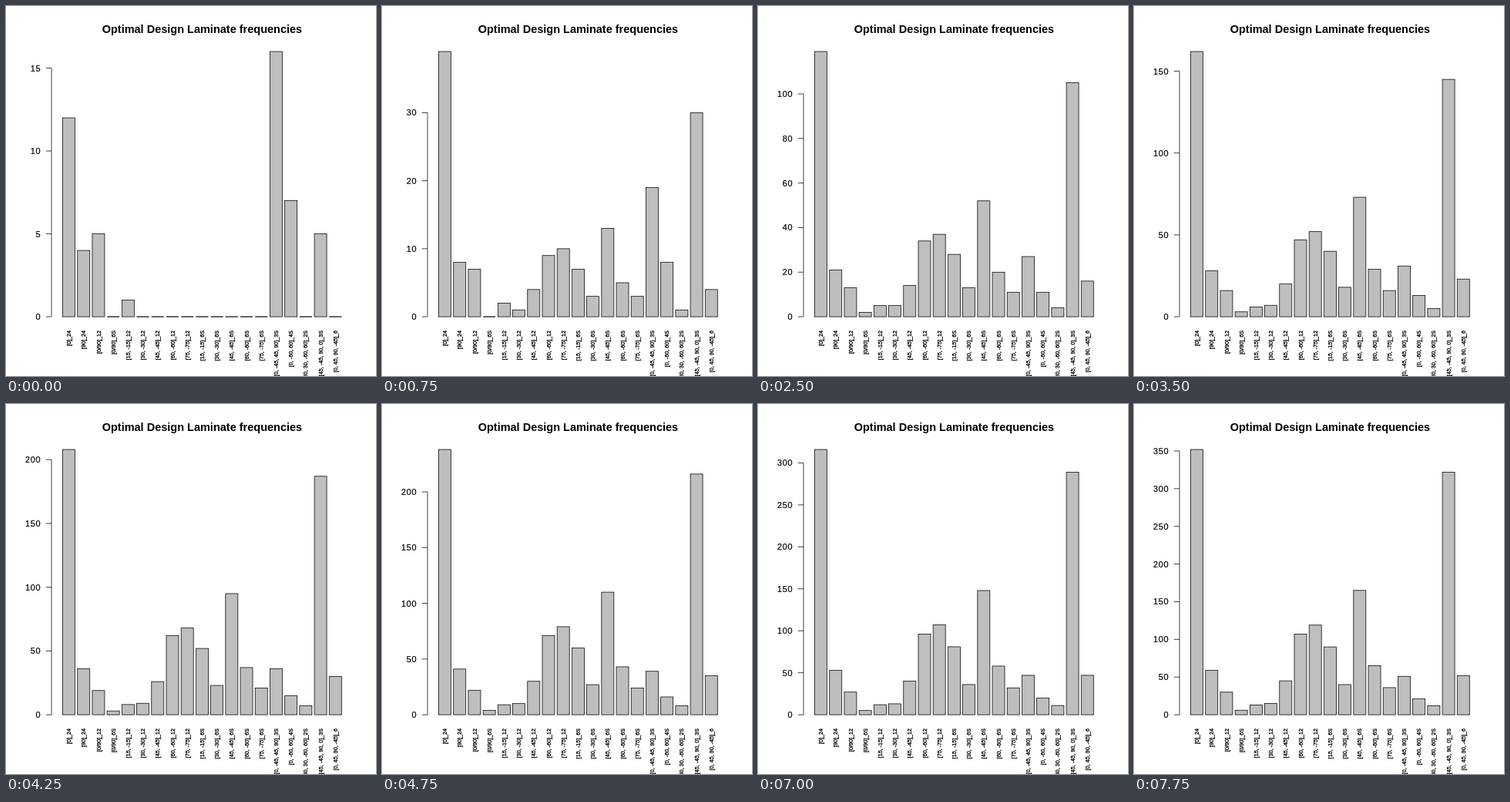
Animation of 480 by 480 pixels, one loop 8000 ms. Source, as an HTML page with a canvas:

```html
<!DOCTYPE html>
<html lang="en">
<head>
<meta charset="utf-8">
<title>Laminate frequencies</title>
<style>
  html, body { margin: 0; width: 100%; height: 100%; overflow: hidden; background: #fff; }
  canvas { display: block; }
</style>
</head>
<body>
<canvas id="chart" width="480" height="480"></canvas>
<script>
const ctx = document.getElementById('chart').getContext('2d');
const FONT = '"Liberation Sans", Arial, sans-serif';
const STEP_MS = 250, STEPS = 32;
const BASE = 403.12, HEIGHT = 344.08, AXIS = 59.04;
const LEFT = 73.51, PITCH = 19.21, BAR = 16.008;

const bar = (label, end, start = 0) => ({ label, end, start });
const bars = [
  bar('[0]_24', 352, 12),
  bar('[90]_24', 59, 4),
  bar('[0/90]_12', 30, 5),
  bar('[0/90]_6S', 6),
  bar('[15, -15]_12', 13, 1),
  bar('[30, -30]_12', 15),
  bar('[45, -45]_12', 45),
  bar('[60, -60]_12', 107),
  bar('[75, -75]_12', 119),
  bar('[15, -15]_6S', 90),
  bar('[30, -30]_6S', 40),
  bar('[45, -45]_6S', 165),
  bar('[60, -60]_6S', 65),
  bar('[75, -75]_6S', 36),
  bar('[0, -45, 45, 90]_3S', 51, 16),
  bar('[0, -60, 60]_4S', 21, 7),
  bar('[-30, 30, -60, 60]_2S', 12),
  bar('[45, -45, 90, 0]_3S', 322, 5),
  bar('[0, 45, 90, -45]_6', 52)
];

// Shared growth curve: [step, share of the growth done]
const growth = [[0, 0], [3, 0.08], [7, 0.22], [14, 0.441], [19, 0.665], [24, 0.756], [31, 1]];

function progress(step) {
  const next = Math.max(1, growth.findIndex(([s]) => s >= step));
  const [s0, p0] = growth[next - 1], [s1, p1] = growth[next];
  return p0 + (p1 - p0) * (step - s0) / (s1 - s0);
}

// Round tick spacing for about five intervals
function tickSpacing(max) {
  const cell = max * 1.01 / 5;
  const base = 10 ** Math.floor(Math.log10(cell));
  let unit = base;
  for (const [factor, bias] of [[2, 0.8], [5, 1.7], [10, 0.8]]) {
    if (factor * base - cell >= bias * (cell - unit)) break;
    unit = factor * base;
  }
  return unit;
}

function line(x1, y1, x2, y2) {
  ctx.beginPath();
  ctx.moveTo(x1, y1);
  ctx.lineTo(x2, y2);
  ctx.stroke();
}

function write(text, x, y, font, align, { spacing = 0, weight = 0 } = {}) {
  ctx.fillStyle = '#000';
  ctx.font = `${font} ${FONT}`;
  ctx.textAlign = align;
  ctx.letterSpacing = spacing + 'px';
  ctx.fillText(text, x, y);
  if (weight) {
    ctx.save();
    ctx.lineWidth = weight;
    ctx.strokeText(text, x, y);
    ctx.restore();
  }
}

function drawAxis(max, yOf) {
  const spacing = tickSpacing(max);
  const top = Math.floor(max / spacing) * spacing;
  line(AXIS, yOf(0), AXIS, yOf(top));
  for (let n = 0; n <= top; n += spacing) {
    const y = yOf(n);
    line(AXIS - 7.2, y, AXIS, y);
    write(n, 45.4, Math.round(y + 4), '11px', 'right', { spacing: 0.7, weight: 0.2 });
  }
}

function drawBar(label, x, y) {
  ctx.fillStyle = '#bebebe';
  ctx.fillRect(x, y, BAR, BASE - y);
  ctx.strokeRect(x, y, BAR, BASE - y);

  ctx.save();
  ctx.translate(x + BAR / 2 + 2.6, 421);
  ctx.rotate(-Math.PI / 2);
  write(label, 0, 0, '7.2px', 'right', { weight: 0.3 });
  ctx.restore();
}

function draw(step) {
  const p = progress(step);
  const counts = bars.map(({ start, end }) => Math.round(start + (end - start) * p));
  const max = Math.max(...counts);
  const yOf = n => BASE - HEIGHT * n / max;

  ctx.fillStyle = '#fff';
  ctx.fillRect(0, 0, 480, 480);
  ctx.strokeStyle = '#000';
  ctx.lineWidth = 0.75;
  write('Optimal Design Laminate frequencies', 254.4, 35, 'bold 14.5px', 'center');
  drawAxis(max, yOf);
  bars.forEach(({ label }, i) => drawBar(label, LEFT + PITCH * i, yOf(counts[i])));
}

let shown = -1;
function tick() {
  const step = Math.floor(performance.now() / STEP_MS) % STEPS;
  if (step !== shown) draw(shown = step);
  requestAnimationFrame(tick);
}
tick();
</script>
</body>
</html>
```
